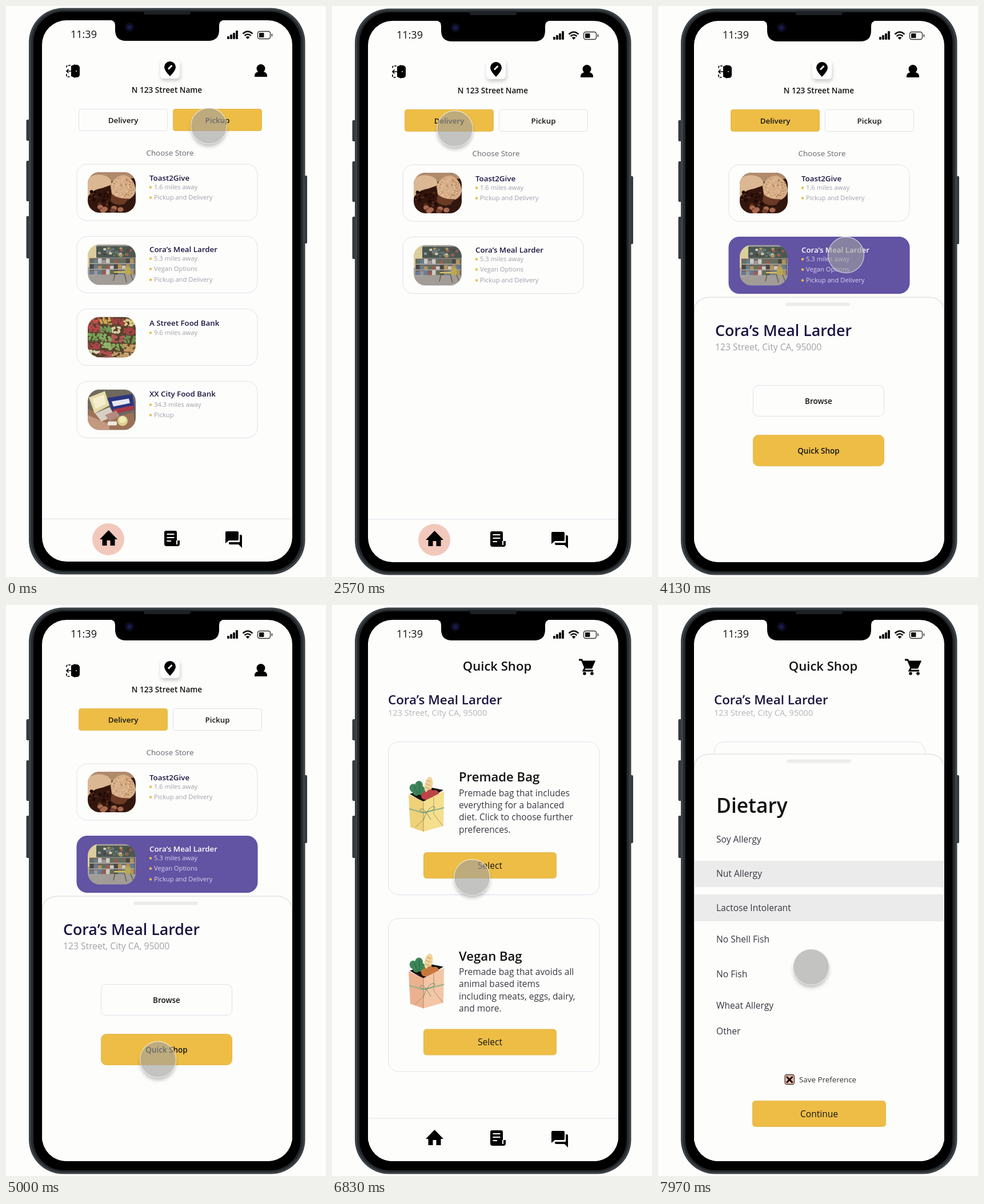
An HTML page that plays this animation: 560x1000 px, repeating every 8 s.

```html
<!DOCTYPE html>
<html lang="en">
<head>
<meta charset="utf-8">
<title>Food pickup app</title>
<style>
  html, body { margin: 0; width: 100%; height: 100%; overflow: hidden; background: #fdfdfc; }
  svg { display: block; width: 100%; height: 100%; }
  text { font-family: "Open Sans", "Noto Sans", sans-serif; }
  .lift { filter: drop-shadow(1px 4px 3px rgba(0, 0, 0, .2)); }
  .soft { filter: blur(3px); }
</style>
</head>
<body>
<svg id="stage" viewBox="0 0 560 1000"></svg>
<script>
const LOOP = 8000;
const YELLOW = '#edbd45', PAPER = '#fdfdfc', INK = '#1c1440', LINE = '#e1e0ea', PURPLE = '#6253a3';
const PANTRY = 'Cora’s Meal Larder', ADDRESS = '123 Street, City CA, 95000';

// ---------- markup helpers ----------
const rect = (x, y, w, h, r, fill, extra = '') =>
  `<rect x="${x}" y="${y}" width="${w}" height="${h}" rx="${r}" fill="${fill}" ${extra}/>`;
const circle = (x, y, r, fill, extra = '') => `<circle cx="${x}" cy="${y}" r="${r}" fill="${fill}" ${extra}/>`;
const ellipse = (x, y, rx, ry, fill, turn = 0) =>
  `<ellipse cx="${x}" cy="${y}" rx="${rx}" ry="${ry}" fill="${fill}" transform="rotate(${turn} ${x} ${y})"/>`;
const path = (d, fill = '#000', extra = '') => `<path d="${d}" fill="${fill}" ${extra}/>`;
const stroke = (d, color, width = 1, extra = '') =>
  path(d, 'none', `stroke="${color}" stroke-width="${width}" ${extra}`);
const text = (x, y, label, size, weight = 400, fill = '#111', anchor = 'start') =>
  `<text x="${x}" y="${y}" font-size="${size}" font-weight="${weight}" fill="${fill}" text-anchor="${anchor}">${label}</text>`;
const group = (body, id = '', extra = '') => `<g ${id && `id="${id}"`} ${extra}>${body}</g>`;
const at = (x, y, body) => group(body, '', `transform="translate(${x} ${y})"`);
const outline = color => `stroke="${color}"`;

function button(x, y, w, h, r, label, size, weight, fill = YELLOW) {
  const edge = fill === YELLOW ? '#e4b94f' : LINE;
  return rect(x + .5, y + .5, w - 1, h - 1, r, fill, outline(edge)) +
    text(x + w / 2, y + h / 2 + size * .38, label, size, weight, '#151515', 'middle');
}

function seeded(seed) {
  return () => (seed = (seed * 16807) % 2147483647) / 2147483647;
}

// ---------- thumbnails, 84 x 71 ----------
function scatter(seed, count, draw) {
  const rnd = seeded(seed);
  return Array.from({ length: count }, (_, i) => draw(rnd, i)).join('');
}

const breadPhoto = () =>
  rect(0, 0, 84, 71, 0, '#32170e') + path('M0 0H84V10L48 14 0 30Z', '#b08a6c') +
  path('M0 12Q10 2 26 5Q42 8 42 22Q30 26 20 30Q8 36 0 46Z', '#dcb793') +
  path('M0 44Q6 32 20 29Q34 26 40 30L44 52Q24 64 6 58Z', '#33150c') +
  path('M40 24Q46 6 64 5Q82 10 84 32Q82 44 70 48Q50 48 42 38Z', '#d6ad86') +
  path('M42 38Q54 48 72 46L64 56Q48 60 40 50Z', '#6b3a25') +
  scatter(71, 90, r => {
    const a = r() * 6.28, d = Math.sqrt(r());
    return circle(62 + 19 * d * Math.cos(a), 26 + 18 * d * Math.sin(a), .9, r() < .5 ? '#efd0ab' : '#a8754f');
  }) +
  scatter(19, 22, r => circle(4 + r() * 34, 34 + r() * 24, 1.5 + r() * 2, r() < .6 ? '#1e0a06' : '#5a2e1d')) +
  scatter(23, 8, r => ellipse(22 + r() * 44, 61 + r() * 8, 5, 4, r() < .5 ? '#a9694f' : '#70402f'));

function pantryPhoto() {
  const goods = ['#9c5a52', '#cfcac2', '#647f92', '#b3945c', '#60705c', '#9d93a0', '#4a4744'];
  const pick = r => goods[Math.floor(r() * goods.length)];
  return rect(0, 0, 84, 71, 0, '#a5a09a') + rect(0, 0, 16, 40, 0, '#dccd9c') +
    rect(15, 3, 69, 20, 0, '#4b5750') +
    scatter(5, 30, r => rect(18 + r() * 60, 4 + r() * 14, 5, 4, 1, pick(r))) +
    rect(3, 24, 80, 30, 0, '#6d6762') +
    scatter(88, 33, (r, i) => {
      const h = 5 + r() * 4, base = 33 + 10 * Math.floor(i / 11);
      return rect(4 + (i % 11) * 7, base - h, 6.500, h, 0, pick(r));
    }) +
    [33, 43, 53].map(y => rect(2, y, 80, 1.3, 0, '#b9b5ae')).join('') +
    path('M0 71V58L22 53H84V71Z', '#a19c98') +
    rect(46, 47, 20, 3, 1, '#d4bd63') + rect(65, 40, 10, 13, 1, '#b9a856') +
    stroke('M48 50L45 64M64 51L68 66M75 52L80 65', '#66603e', 1.500);
}

function producePhoto() {
  const rows = [
    ['#c2524f', '#d0a653', '#a94144', '#dccb82'], ['#b3474a', '#6f9a5b', '#ddcfa6', '#a34343'],
    ['#74a45a', '#83ae62', '#b95a56', '#6a9450'], ['#ad4549', '#90b56a', '#86a85c', '#c79c62'],
    ['#d9d2b6', '#b04d50', '#bd986a', '#cda675']
  ];
  return rect(0, 0, 84, 71, 0, '#54402c') +
    scatter(43, 420, (r, i) => {
      const row = Math.floor(i / 84), x = r() * 84, y = row * 14.500 + r() * 12 + x * .06;
      return ellipse(x, y, 2.600, 1.900, rows[row][Math.floor(x / 21.01)], r() * 90);
    }) +
    [14, 29, 44, 59].map(y => stroke(`M0 ${y - 3}L84 ${y + 4}`, '#5e4a33', 1.600)).join('');
}

const parcelPhoto = () =>
  rect(0, 0, 84, 71, 0, '#6f685e') + path('M0 34L44 50 80 40 84 71H0Z', '#9b7257') +
  path('M0 45L38 61V71H0Z', '#c39a80') + path('M2 14L30 3 38 28 12 42Z', '#e6dba8') +
  path('M8 17L28 9 32 25 14 34Z', '#f4edcf') + path('M34 15L78 8 82 35 45 43Z', '#2b357f') +
  path('M42 21L72 16 74 24 45 30Z', '#e7e7f1') + path('M44 35L80 28 81 35 46 43Z', '#a93843') +
  path('M13 42L38 31 48 46 24 56Z', '#d8cfc3') + path('M30 45L50 37 56 47 39 55Z', '#b38a80') +
  circle(61, 55, 9, '#ddd28c') + circle(61, 53, 6, '#f0eab9') + rect(35, 56, 16, 7, 2, '#efe8dc');

const photo = (y, art) => at(143, y, group(art(), '', 'clip-path="url(#thumb)"'));

// ---------- icons ----------
const homeIcon = path('M164 935L179.500 919 195 935H190.500V946H182.500V937H176.500V946H168.500V935Z');
const receiptIcon = path('M277 923Q277 920 280 920H296Q299 920 299 923V937H304V943Q304 947 300 947H281Q277 947 277 943Z') +
  stroke('M281.500 926H294.500M281.500 932H294.500M281.500 938H289M299 937V944', PAPER, 2);
const chatIcon = path('M386 921H405Q407 921 407 923V935Q407 937 405 937H390L384 942V923Q384 921 386 921Z') +
  path('M409 927H411Q413 927 413 929V950L407 944H392Q390 944 390 942V940H409Z');
const personIcon = circle(446, 110.500, 7.500, '#000') +
  path('M435 125V122Q436 117 442 116H450Q456 117 457 122V125Z');
const doorIcon = path('M114 106L121 103V127L114 124Z') + path('M120 104H125Q129 106 129 109V121Q129 125 125 126H120Z') +
  stroke('M113 105H108Q106 105 106 108V110M106 120V123Q106 125 108 125H113', '#000', 1.700, 'stroke-dasharray="4 1.5"') +
  stroke('M114 115H106M109.500 111.500L106 115L109.500 118.500', '#000', 1.600) + circle(123, 115, 1, PAPER);
const pinIcon = rect(270, 95, 34, 33, 6, '#fff', 'class="lift"') +
  path('M287 124Q277 114 277 108A10 10 0 0 1 297 108Q297 114 287 124Z') +
  stroke('M284 111.500L290.500 105', '#fff', 3);
const cartIcon = stroke('M432 96H437L443 110H454L459 99H438M443 109L440 115H457', '#000', 2.800) +
  path('M438 98H460L455 111H443Z') + circle(442, 120, 2.800, '#000') + circle(455, 120, 2.800, '#000');

function statusBar() {
  const bars = [5, 8, 11, 15].map((h, i) => rect(387 + i * 5, 59 - h, 4, h, 1, '#111')).join('');
  const wifi = stroke('M414.500 49.500Q423 41.500 431.500 49.500M417.500 53Q423 48 428.500 53', '#111', 2.600) +
    path('M419.500 55.500Q423 52.500 426.500 55.500L423 59Z', '#111');
  const battery = rect(440.500, 45.500, 22, 13, 3.500, 'none', 'stroke="#333" stroke-width="1.4"') +
    rect(443, 48, 8.500, 8, 1, '#111') + rect(464.500, 49.500, 1.800, 5, 1, '#444');
  return text(113, 57, '11:39', 18, 400, '#111') + bars + wifi + battery;
}

const navBar = active => rect(63, 898.500, 438, 1, 0, LINE) +
  (active ? circle(179, 935, 28, '#f3c8bc') : '') + homeIcon + receiptIcon + chatIcon;

// ---------- store list ----------
function store(y, name, nameY, lines, art, selected = false) {
  const [fill, ink, soft] = selected ? [PURPLE, '#fff', '#d9d4ee'] : [PAPER, INK, '#a09fa9'];
  return rect(124, y + .5, 316, 99, 18, fill, outline(selected ? PURPLE : LINE)) + photo(y + 14.500, art) +
    text(251, nameY, name, 13.350, 600, ink) +
    lines.map(([lineY, label]) => circle(253, lineY - 3.500, 2.200, YELLOW) +
      text(259, lineY, label, 11.200, 400, soft)).join('');
}

const pantryCard = selected => store(404, PANTRY, 431.500,
  [[447, '5.3 miles away'], [465, 'Vegan Options'], [484, 'Pickup and Delivery']], pantryPhoto, selected);

const modeButton = (x, label, id) => button(x, 181, 156, 39, 4, label, 13.350, 600, PAPER) +
  group(button(x, 181, 156, 39, 4, label, 13.350, 600), id);

const storeList = doorIcon + pinIcon + personIcon +
  text(281.500, 153, 'N 123 Street Name', 13.600, 600, '#111', 'middle') +
  modeButton(127, 'Delivery', 'deliveryOn') + modeButton(292, 'Pickup', 'pickupOn') +
  text(287, 263, 'Choose Store', 13.400, 400, '#66666c', 'middle') +
  store(277.500, 'Toast2Give', 306.500, [[322, '1.6 miles away'], [340, 'Pickup and Delivery']], breadPhoto) +
  pantryCard(false) + group(pantryCard(true), 'pantryOn') +
  group(
    store(531, 'A Street Food Bank', 560.500, [[577, '9.6 miles away']], producePhoto) +
    store(658, 'XX City Food Bank', 685, [[703, '34.3 miles away'], [721, 'Pickup']], parcelPhoto), 'pickupOnly') +
  navBar(true);

// ---------- sheets ----------
const sheet = (y, handleX) =>
  path(`M63 1000V${y + 28}Q63 ${y} 93 ${y}H471Q501 ${y} 501 ${y + 28}V1000Z`, PAPER,
    'stroke="#e3e3e3" stroke-width="1.5"') + rect(handleX, y + 9.500, 113, 6, 3, '#ececec');

const storeSheet = sheet(510, 223) + text(100, 577.500, PANTRY, 26.800, 600, INK) +
  text(100, 603, ADDRESS, 15.700, 400, '#a3a3a6') +
  button(166, 664, 230, 55, 9, 'Browse', 13.500, 600, PAPER) +
  button(166, 751, 230, 55, 9, 'Quick Shop', 13.500, 600);

const dietItems = [['Soy Allergy', 416], ['Nut Allergy', 475.500], ['Lactose Intolerant', 536],
  ['No Shell Fish', 590.500], ['No Fish', 652], ['Wheat Allergy', 707], ['Other', 752]];
const dietSheet = sheet(261, 225) + text(102, 363.500, 'Dietary', 35.300, 600, '#111') +
  group(rect(63, 448, 438, 46, 0, '#ebebeb'), 'nutOn') + group(rect(63, 507, 438, 47, 0, '#ebebeb'), 'lactoseOn') +
  dietItems.map(([label, y]) => text(102, y, label, 15.600, 400, '#38353f')).join('') +
  rect(222, 822.500, 16.500, 17, 3.500, '#e9b3a3', 'stroke="#443" stroke-width="1.3"') +
  stroke('M225 826L235.500 836.500M235.500 826L225 836.500', '#000', 2.800) +
  text(247, 835.500, 'Save Preference', 13.400, 400, '#333') +
  button(165, 868, 234, 46, 5, 'Continue', 15.600, 400);

// ---------- quick shop ----------
function groceryBag(y, front, side, filling) {
  const leaves = [[143, 321, -30], [152, 316, 5], [148, 326, 20], [156, 325, 25]]
    .map(([x, leafY, turn]) => ellipse(x, leafY, 7, 8, '#3d8559', turn)).join('');
  return at(0, y,
    path('M136 331L170 319 195 324 160 345Z', '#15120f') + leaves +
    stroke('M144 318L151 333M153 312L153 331', '#25633f', 1) +
    ellipse(169, 315, 7, 14, '#f2d49b', 12) + stroke('M166 307L173 310M164 313L172 316M163 319L171 322', '#d19858', 1.300) +
    [[163, 334], [172, 330], [180, 331], [170, 338]].map(([x, fy]) => circle(x, fy, 7, filling)).join('') +
    path('M134 332L160 344V397L137 389Z', side) + path('M160 344L196 326 195 387 160 397Z', front) +
    stroke('M160 345V397M160 376L146 389M178 336V366L194 387', '#786a4d', .6) +
    stroke('M135 357L160 364L196 355', '#8fb08a', 2) +
    stroke('M165 363Q176 349 180 354Q181 359 165 363Q156 353 154 359Q154 363 165 363L173 376M165 363L160 377', '#6f8f6c', 1));
}

function bagCard(y, title, titleY, lines, ...colors) {
  return rect(98.500, y + .5, 369, 268, 18, PAPER, outline(LINE)) + groceryBag(y - 239, ...colors) +
    text(222, titleY, title, 22.100, 600) +
    lines.map((line, i) => text(222, titleY + 25.500 + i * 21.400, line, 15.600, 400, '#3c3942')).join('') +
    button(160, y + 194, 233, 46, 5, 'Select', 15.600, 400);
}

const quickShop = rect(63, 66, 438, 908, 0, PAPER) +
  text(289, 114.500, 'Quick Shop', 22.100, 600, '#111', 'middle') + cartIcon +
  text(98, 173.500, PANTRY, 22.400, 600, INK) + text(98, 194, ADDRESS, 14.600, 400, '#b5b5b9') +
  bagCard(239, 'Premade Bag', 309, ['Premade bag that includes', 'everything for a balanced',
    'diet. Click to choose further', 'preferences.'], '#f5df8d', '#eed179', '#bd4447') +
  bagCard(548.500, 'Vegan Bag', 622.500, ['Premade bag that avoids all', 'animal based items',
    'including meats, eggs, dairy,', 'and more.'], '#f3c6a5', '#ecb18f', '#c9783d') +
  navBar(false);

// ---------- phone ----------
const SCREEN = [63, 26, 438, 948, 43];
const sideButton = (x, y, h) => rect(x, y, 7, h, 2, '#34393d');
const phoneBack = sideButton(35.500, 200, 37) + sideButton(35.500, 272, 71) + sideButton(35.500, 369, 74) +
  sideButton(520, 298, 119) +
  rect(40, 4.500, 483.500, 992, 60, '#3b4145') + rect(44, 8, 475.500, 985, 56, '#24292c') +
  rect(48, 11, 467.500, 979, 53, '#000') + rect(...SCREEN, PAPER);
const notch = path('M182 25H382Q373 27 373 35V43Q373 62 354 62H210Q191 62 191 43V35Q191 27 182 25Z') +
  rect(241, 10, 82, 6, 3, '#1d2024') + circle(216, 38, 8, '#0b0c1c') + circle(216, 38, 4, '#171b4a');
const pointer =
  group(group(circle(0, 5, 31, 'rgba(0,0,0,.25)', 'class="soft"'), '', 'clip-path="url(#outside)"'), 'shadow') +
  circle(0, 0, 31.500, '', 'id="disc" stroke="rgba(255,255,255,.6)" stroke-width="1.3"');

const stage = document.getElementById('stage');
stage.innerHTML =
  `<defs><clipPath id="thumb">${rect(0, 0, 84, 71, 21, '#000')}</clipPath>
   <clipPath id="screen">${rect(...SCREEN, '#000')}</clipPath>
   <clipPath id="outside">${path('M-50-50H50V50H-50ZM-31 0A31 31 0 1 0 31 0A31 31 0 1 0-31 0Z', '#000',
    'clip-rule="evenodd"')}</clipPath></defs>` +
  group(phoneBack +
    group(storeList + group(storeSheet, 'storeSheet') +
      group(quickShop + group(dietSheet, 'dietSheet'), 'quickShop') + statusBar(), '', 'clip-path="url(#screen)"') +
    notch, 'phone') +
  group(pointer, 'cursor');

// ---------- motion ----------
const el = Object.fromEntries([...stage.querySelectorAll('[id]')].map(node => [node.id, node]));
const clamp = v => Math.min(1, Math.max(0, v));
const ramp = (t, start, length) => clamp((t - start) / length);
const ease = v => v * v * (3 - 2 * v);
const easeOut = v => 1 - (1 - v) ** 3;
const show = (name, v) => el[name].setAttribute('opacity', v);
const move = (name, x, y) => el[name].setAttribute('transform', `translate(${x} ${y})`);

// time, x, y
const route = [[0, 355, 210], [1070, 333, 210], [1250, 333, 210], [1650, 215, 215], [2700, 215, 215],
  [3250, 329, 436], [4250, 329, 436], [4900, 266, 796], [5900, 266, 796], [6450, 245, 477],
  [6960, 245, 477], [7250, 268, 478], [7420, 268, 478], [7600, 268, 540], [7700, 268, 540], [7950, 268, 634]];

function cursorAt(t) {
  const next = route.findIndex(stop => stop[0] > t);
  if (next < 0) return route[route.length - 1].slice(1);
  const [t0, x0, y0] = route[next - 1], [t1, x1, y1] = route[next];
  const k = ease((t - t0) / (t1 - t0));
  return [x0 + (x1 - x0) * k, y0 + (y1 - y0) * k];
}

function draw(t) {
  const delivery = ramp(t, 1690, 200), chosen = ramp(t, 3380, 150);
  move('phone', 0, delivery > 0 ? 0 : -1);
  show('deliveryOn', delivery);
  show('pickupOn', 1 - delivery);
  show('pickupOnly', 1 - delivery);
  show('pantryOn', chosen);
  move('storeSheet', 0, 500 * (1 - easeOut(ramp(t, 3400, 320))));
  show('quickShop', ramp(t, 5810, 200));
  move('dietSheet', 0, 740 * (1 - easeOut(ramp(t, 6960, 300))));
  show('nutOn', t >= 7360 ? 1 : 0);
  show('lactoseOn', t >= 7650 ? 1 : 0);

  const tapping = t > 5500 && t < 5900;
  show('shadow', tapping || (t > 3350 && t < 4250) ? 0 : 1);
  el.disc.setAttribute('fill', tapping ? 'rgba(20,20,20,.25)' : 'rgba(160,160,160,.62)');
  move('cursor', ...cursorAt(t));
}

function tick(now) {
  draw(now % LOOP);
  requestAnimationFrame(tick);
}
draw(0);
requestAnimationFrame(tick);
</script>
</body>
</html>
```
